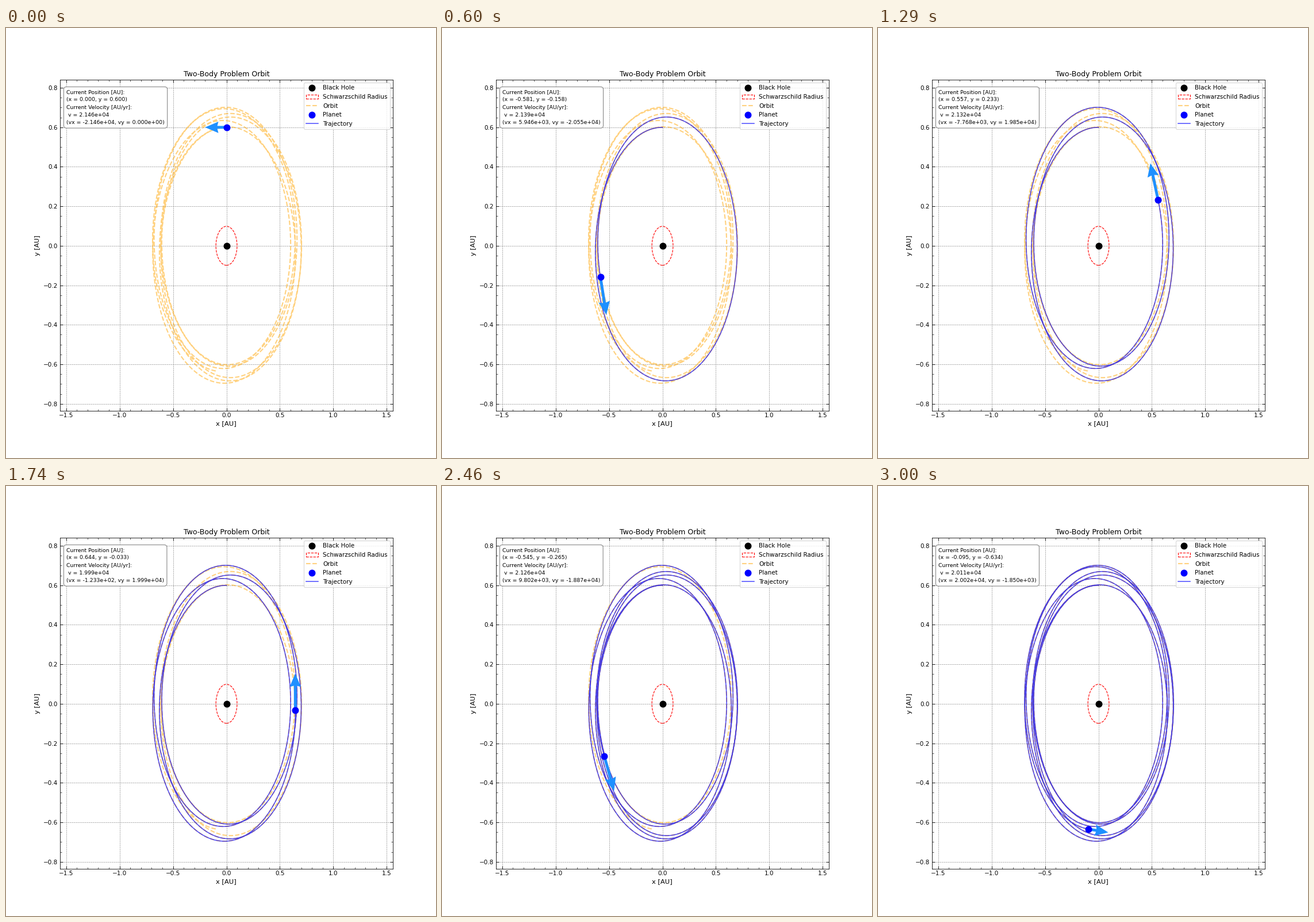
Write a matplotlib script that moves like this. It is 748 by 748 pixels and loops after 3030 ms.

```python
import numpy as np
import matplotlib.pyplot as plt
from matplotlib.animation import FuncAnimation
from matplotlib.patches import Circle
from matplotlib.ticker import AutoMinorLocator

STAGE, DPI = 748, 75
FRAMES, INTERVAL = 101, 30
SUBSTEPS = 30

# Units: AU, years, solar masses
GM = 4 * np.pi**2 * 5e6
C = 63197.8
R0, ECC = 0.6, 0.4
V0 = np.sqrt(GM * (1 + ECC) / R0)
L2 = (R0 * V0) ** 2
RS = 2 * GM / C**2
SPAN = 1.341584e-3


def deriv(s):
    """Newtonian gravity with the relativistic 1/r^4 term."""
    x, y, vx, vy = s
    r2 = x * x + y * y
    k = -GM / r2**1.5 * (1 + 3 * L2 / (C**2 * r2))
    return np.array([vx, vy, k * x, k * y])


def integrate():
    n = (FRAMES - 1) * SUBSTEPS
    h = SPAN / n
    out = np.empty((n + 1, 4))
    out[0] = 0.0, R0, -V0, 0.0
    for i in range(n):
        s = out[i]
        k1 = deriv(s)
        k2 = deriv(s + h / 2 * k1)
        k3 = deriv(s + h / 2 * k2)
        k4 = deriv(s + h * k3)
        out[i + 1] = s + h / 6 * (k1 + 2 * k2 + 2 * k3 + k4)
    return out


path = integrate()

fig, ax = plt.subplots(figsize=(STAGE / DPI, STAGE / DPI), dpi=DPI)
ax.set_title("Two-Body Problem Orbit", fontsize=12)
ax.set_xlabel("x [AU]", fontsize=11)
ax.set_ylabel("y [AU]", fontsize=11)
ax.set_xlim(-1.56, 1.558)
ax.set_ylim(1.2 * path[:, 1].min(), 1.2 * path[:, 1].max())
ax.xaxis.set_minor_locator(AutoMinorLocator())
ax.yaxis.set_minor_locator(AutoMinorLocator())
ax.tick_params(which="both", direction="in", top=True, right=True)
ax.tick_params(which="major", length=5)
ax.tick_params(which="minor", length=3)
ax.grid(color="gray", linestyle="--", linewidth=0.6)

ax.plot(0, 0, "o", color="black", ms=10.5, ls="none", label="Black Hole")
ax.add_patch(Circle((0, 0), RS, fill=False, color="red", ls="--", lw=1.1,
                    label="Schwarzschild Radius"))
ax.plot(path[:, 0], path[:, 1], "--", color="orange", lw=2, alpha=0.5,
        label="Orbit")
planet, = ax.plot([], [], "o", color="blue", ms=10.5, ls="none", zorder=4,
                  label="Planet")
trail, = ax.plot([], [], color="blue", lw=1.5, alpha=0.7, label="Trajectory")
arrow = ax.quiver([0], [R0], [-V0], [0], color="dodgerblue", angles="xy",
                  scale_units="xy", scale=5 * V0, width=0.0085, headwidth=4,
                  headlength=4.7, headaxislength=4.3, zorder=3)
info = ax.text(0.02, 0.97, "", transform=ax.transAxes, fontsize=9, va="top",
               linespacing=1.62, zorder=5,
               bbox=dict(boxstyle="round,pad=0.5", fc="white", ec="gray"))
ax.legend(loc="upper right", fontsize=10, labelspacing=0.545, borderpad=0.42)


def update(n):
    i = n * SUBSTEPS
    x, y, vx, vy = path[i]
    planet.set_data([x], [y])
    trail.set_data(path[:i + 1, 0], path[:i + 1, 1])
    arrow.set_offsets([[x, y]])
    arrow.set_UVC([vx], [vy])
    info.set_text(
        "Current Position [AU]:\n"
        f"(x = {x:.3f}, y = {y:.3f})\n"
        "Current Velocity [AU/yr]:\n"
        f" v = {np.hypot(vx, vy):.3e}\n"
        f"(vx = {vx:.3e}, vy = {vy:.3e})")
    return planet, trail, arrow, info


anim = FuncAnimation(fig, update, frames=FRAMES, interval=INTERVAL,
                     repeat=True, repeat_delay=0)
plt.show()
```
